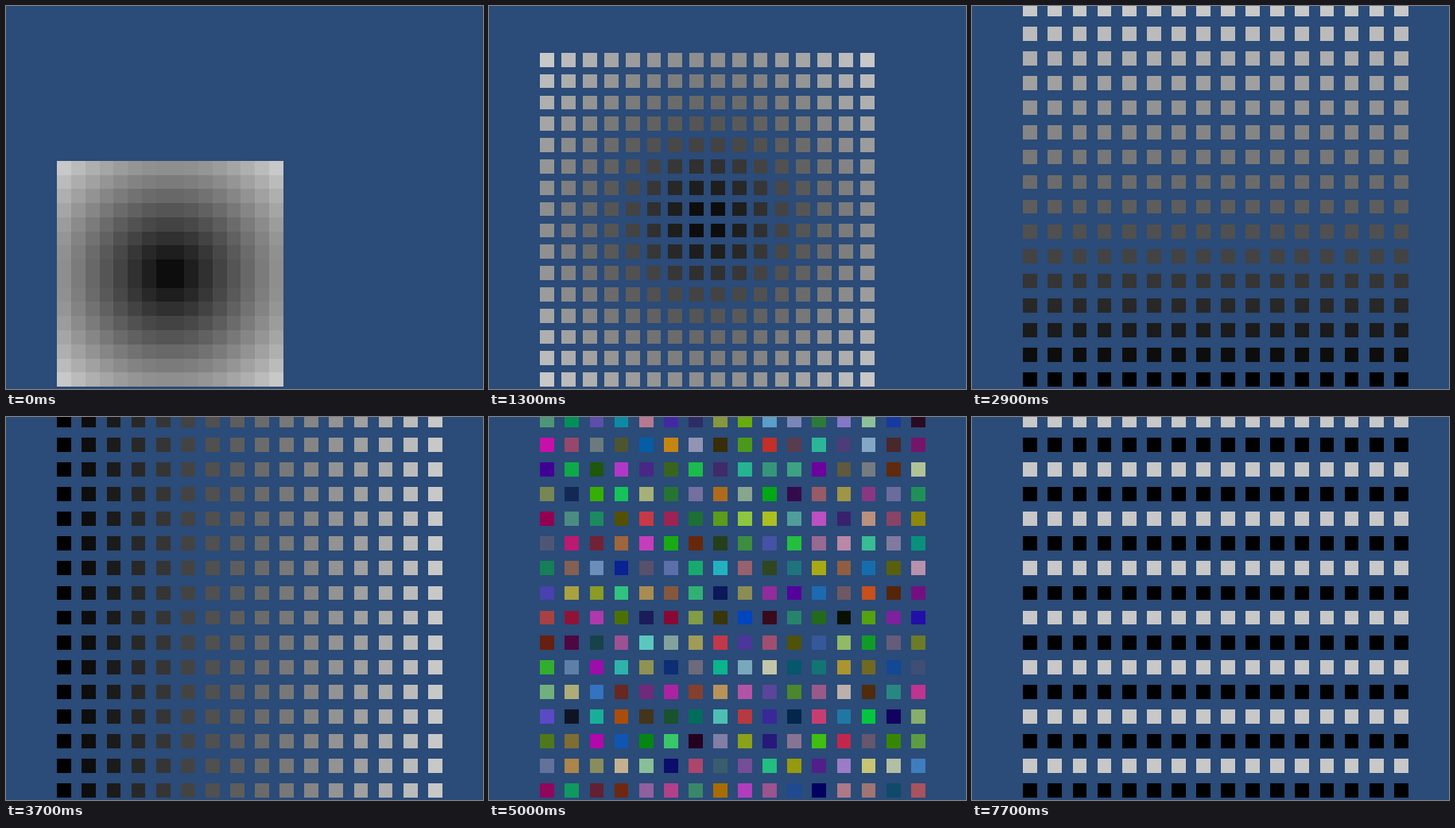
An HTML page with a canvas that plays this animation: 600x482 px, repeating every 8.6 s.

```html
<!DOCTYPE html>
<html lang="en">
<head>
<meta charset="utf-8">
<title>Grid patterns</title>
<style>
  html, body { margin: 0; width: 100%; height: 100%; overflow: hidden; background: #2b4b78; }
  canvas { display: block; }
</style>
</head>
<body>
<canvas id="stage" width="600" height="482"></canvas>
<script>
const ctx = document.getElementById('stage').getContext('2d');
const LOOP = 8600, COUNT = 16, CELL = 17.77, LEFT = 64.4, BOTTOM = 479.1, LIGHT = 200;
const MID = (COUNT - 1) / 2;

const gray = share => {
  const v = Math.round(LIGHT * share);
  return `rgb(${v},${v},${v})`;
};

function seededRandom(seed) {
  return () => {
    seed = (seed + 0x6D2B79F5) | 0;
    let n = Math.imul(seed ^ (seed >>> 15), 1 | seed);
    n = (n + Math.imul(n ^ (n >>> 7), 61 | n)) ^ n;
    return ((n ^ (n >>> 14)) >>> 0) / 4294967296;
  };
}

function noise(seed) {
  const random = seededRandom(seed);
  const channel = () => Math.floor(random() * (LIGHT + 1));
  return () => `rgb(${channel()},${channel()},${channel()})`;
}

// Column x counts from the left, row y from the bottom.
const radial = (x, y) => gray(Math.hypot(x - MID, y - MID) / Math.hypot(MID, MID));
const vertical = (x, y) => gray(y / (COUNT - 1));
const horizontal = x => gray(x / (COUNT - 1));
const checker = (x, y) => gray((x + y) % 2);
const columns = x => gray(x % 2);
const rows = (x, y) => gray(y % 2);

const WIDE = 1.75;
const steps = [[0, radial, 1], [700, radial, 1.03]];
for (let i = 0; i < 8; i++) steps.push([900 + i * 100, radial, 1.19 + i * 0.08]);
steps.push([2900, vertical, WIDE], [3700, horizontal, WIDE]);
for (let i = 0; i < 4; i++) steps.push([4800 + i * 100, i + 1, WIDE]);
steps.push([5700, checker, WIDE], [6600, columns, WIDE], [7700, rows, WIDE]);

function draw([, pattern, spacing]) {
  const colour = typeof pattern === 'number' ? noise(pattern) : pattern;
  ctx.fillStyle = '#2b4b78';
  ctx.fillRect(0, 0, 600, 482);
  for (let y = 0; y < COUNT; y++) {
    const low = BOTTOM - y * CELL * spacing;
    const top = Math.round(low - CELL);
    for (let x = 0; x < COUNT; x++) {
      const start = LEFT + x * CELL * spacing;
      const left = Math.round(start);
      ctx.fillStyle = colour(x, y);
      ctx.fillRect(left, top, Math.round(start + CELL) - left, Math.round(low) - top);
    }
  }
}

const origin = performance.now();
let shown;
function tick() {
  const time = (performance.now() - origin) % LOOP;
  const step = steps.findLast(([start]) => start <= time);
  if (step !== shown) draw(shown = step);
  requestAnimationFrame(tick);
}
tick();
</script>
</body>
</html>
```
